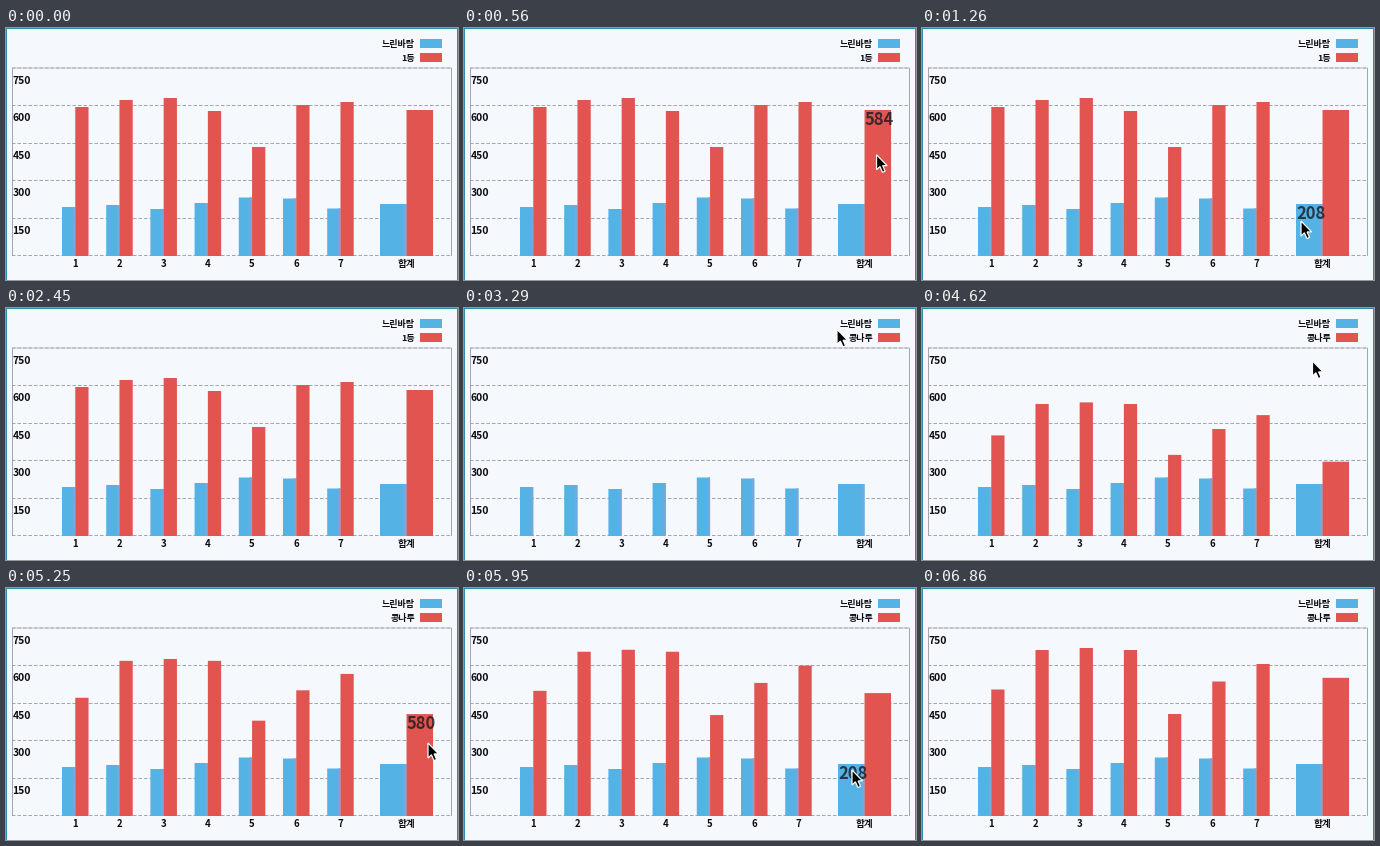
A matplotlib script for the animation above (6930 ms loop, 452 by 252 pixels).

```python
import matplotlib.pyplot as plt
import numpy as np
from matplotlib.animation import FuncAnimation
from matplotlib.patches import Polygon, Rectangle

W, H, DPI = 452, 252, 64
STEP, FRAMES = 70, 99
BASE, SCALE = 228, 0.25           # baseline y, pixels per point
PITCH, BAR = 44.2, 13.26          # group spacing, bar width
SWITCH = 3080                     # second rival replaces the first
REST = 350                        # pause of the pointer at each stop
BLUE, RED, SEAM = "#54b2e5", "#e15450", "#74a9dc"
GRID, EDGE, INK, PAPER = "#a3a7ad", "#2f8cae", "#0c0c10", "#f5f9fe"

# Scores of the seven rounds; the total is their mean
PLAYER = [196, 204, 188, 212, 234, 230, 190]
RIVALS = {"1등": [596, 624, 632, 580, 436, 604, 616],
          "콩나루": [506, 664, 672, 664, 408, 538, 608]}

# Pointer stops: arrival in ms, tip x, tip y
PATHS = [
    [(70, 446, 238), (700, 403, 95), (1260, 379, 193), (1750, 294, 150),
     (2380, 345, 190)],
    [(3080, 378, 7), (3710, 363, 50), (4550, 390.5, 53), (5110, 422, 155),
     (5600, 388, 182), (6370, 296, 150), (6840, 284, 231)],
]
ARROW = np.array([(0, 0), (0, 15), (3.4, 11.8), (6, 17.6), (8.6, 16.4),
                  (6.1, 10.9), (10.6, 10.9)])

fig = plt.figure(figsize=(W / DPI, H / DPI), dpi=DPI, facecolor=PAPER)
ax = fig.add_axes([0, 0, 1, 1])
ax.set(xlim=(0, W), ylim=(H, 0))
ax.axis("off")


def points(px):
    return px * 72 / DPI


def label(x, y, text, size=10.3, align="center", **style):
    """Bold text with its capitals centred on y."""
    style = {"color": INK, "zorder": 5, **style}
    return ax.text(x, y + 0.36 * size, text, fontsize=points(size), ha=align,
                   va="baseline", family="Noto Sans CJK JP", weight="bold",
                   **style)


def rect(x, y, w, h, color):
    return ax.add_patch(Rectangle((x, y), w, h, fc=color, lw=0, zorder=3,
                                  snap=False))


def line(xs, ys, color=GRID, **style):
    ax.plot(xs, ys, color=color, lw=points(1), zorder=1, snap=False,
            solid_capstyle="butt", **style)


def with_total(scores):
    return [*scores, round(np.mean(scores))]


def bar_slot(i):
    """Left edge and bar width of group i; the total is twice as wide."""
    return (374, 2 * BAR) if i == 7 else (56 + PITCH * i, BAR)


def draw_chart():
    line((0, W), (0.5, 0.5), EDGE)
    for x in (0.5, W - 0.5):
        line((x, x), (0, H), EDGE)
    for x in (6.5, 445.5):
        line((x, x), (40, BASE))
    line((6, 446), (40, 40), alpha=0.6)
    for i in range(6):
        y = int(40 + 37.5 * i)
        line((6, 446), (y + 0.5 * (i > 0), ) * 2, dashes=(3.5, 2))
        if i < 5:
            label(6.5, y + 12, str(750 - 150 * i), align="left")
    rect(414, 11, 22, 9, BLUE)
    rect(414, 25, 22, 9, RED)
    label(409, 16, "느린바람", 9, "right")


def growth(t, is_total):
    """Ease-out from nothing; the total rises later and slower."""
    start, duration, power = (3500, 5260, 3) if is_total else (3386, 3770, 4)
    left = np.clip(1 - (t - start) / duration, 0, 1)
    return 1 - left ** power


def pointer(t):
    for first, *stops in PATHS:
        if first[0] <= t <= stops[-1][0]:
            keys = [first] + [(at + wait, x, y) for at, x, y in stops
                              for wait in (0, REST)]
            times, xs, ys = zip(*keys)
            return np.interp(t, times, xs), np.interp(t, times, ys)
    return None


draw_chart()
blues, reds = [], []
for i, value in enumerate(with_total(PLAYER)):
    x, w = bar_slot(i)
    h = value * SCALE
    blues.append(rect(x, BASE - h, w, h, BLUE))
    rect(x + w - 2.5, BASE - h, 2.5, h, SEAM)
    reds.append(rect(x + w, BASE, w, 0, RED))
    label(x + w, 236, "합계" if i == 7 else str(i + 1), 9.6)

rival = label(409, 30, "", 9, "right")
tip = label(0, 0, "", 16.5, "left", color="#1c1c24", alpha=0.82, zorder=6)
arrow = ax.add_patch(Polygon(ARROW, fc="black", ec="white", lw=points(1.2),
                             zorder=8))


def hovered(x, y, scores):
    """Bar under the pointer and its score."""
    bars = zip(blues + reds, with_total(PLAYER) + scores)
    for bar, value in bars:
        inside_x = 0 <= x - bar.get_x() < bar.get_width()
        if inside_x and bar.get_y() <= y < BASE:
            return bar, value
    return None


def update(frame):
    t = frame * STEP
    first, second = RIVALS
    name = first if t < SWITCH else second
    rival.set_text(name)
    scores = with_total(RIVALS[name])
    for i, (red, value) in enumerate(zip(reds, scores)):
        h = value * SCALE * (1 if name == first else growth(t, i == 7))
        red.set_y(BASE - h)
        red.set_height(h)

    spot = pointer(t)
    hit = spot and hovered(*spot, scores)
    arrow.set_visible(bool(spot))
    tip.set_visible(bool(hit))
    if spot:
        arrow.set_xy(ARROW + spot)
    if hit:
        bar, value = hit
        tip.set_text(str(value))
        tip.set_position((bar.get_x(), bar.get_y() + 15))
    return [*reds, rival, tip, arrow]


anim = FuncAnimation(fig, update, frames=FRAMES, interval=STEP, repeat=True,
                     repeat_delay=0, blit=False)
plt.show()
```
